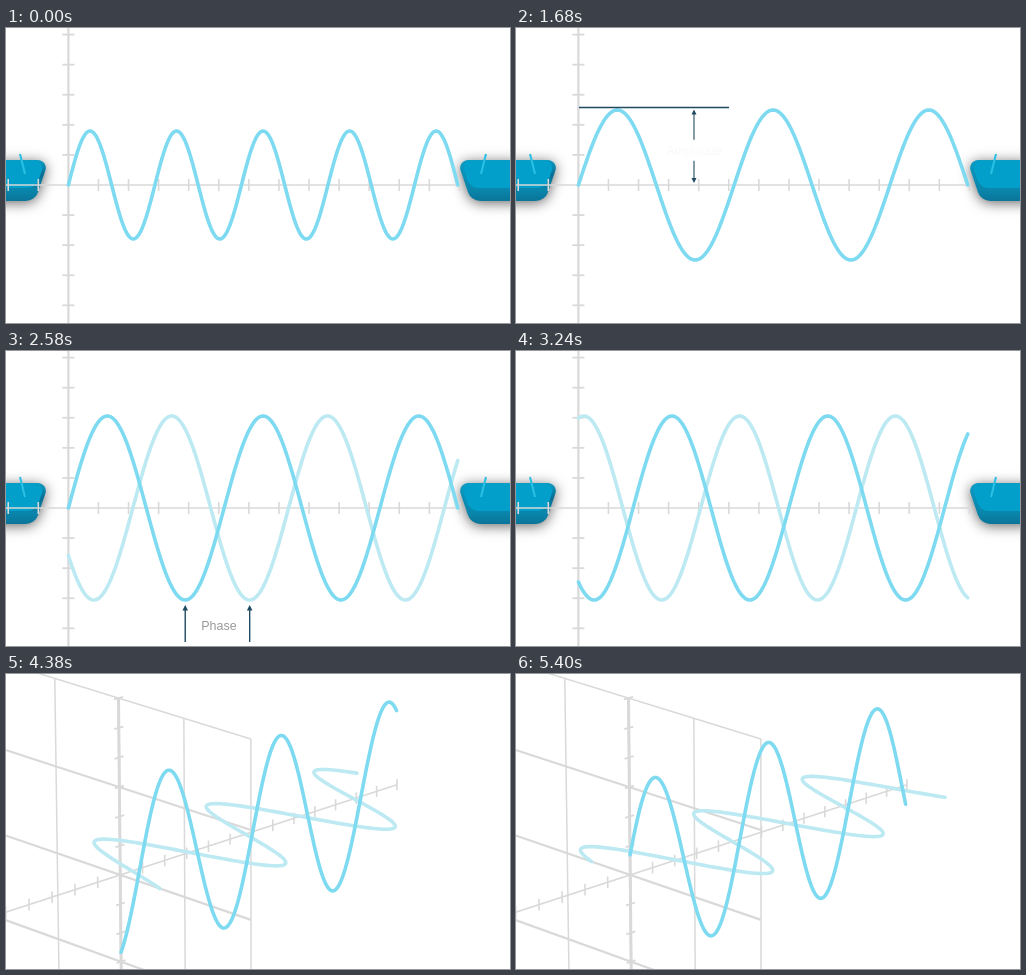
An HTML page with a canvas that plays this animation: 504x295 px, repeating every 5460 ms.

```html
<!DOCTYPE html>
<html lang="en">
<head>
<meta charset="utf-8">
<title>Wave properties</title>
<style>
  html, body { margin: 0; width: 100%; height: 100%; overflow: hidden; background: #fff; }
  canvas { display: block; }
</style>
</head>
<body>
<canvas id="stage" width="504" height="295"></canvas>
<script>
const ctx = document.getElementById('stage').getContext('2d');
const LOOP = 5460, STEP = 60;
const TICK = 30.08, LENGTH = 13 * TICK, HALF = LENGTH / 2, SPAN = 389.4;
const FOCUS = 5000, TAU = Math.PI * 2;
const GREY = '#d9d9d9', INK = '#1f4a60', DARK = '#7ddaf0', LIGHT = '#bce9f2';

const ramp = (t, a, b) => Math.min(1, Math.max(0, (t - a) / (b - a)));
const ease = (t, a, b) => { const x = ramp(t, a, b); return x * x * (3 - 2 * x); };
const mix = (a, b, k) => a + (b - a) * k;
const pulse = (t, a, b, c, d) => ramp(t, a, b) * (1 - ramp(t, c, d));

// Travel of the waves in periods: [time, value, speed per ms]
const TRAVEL = [
  [2640, 0, 0], [3240, 0.351, 0.000625], [3660, 0.637, 0.000718],
  [4380, 1.169, 0.000766], [5400, 1.964, 0.00078]
];

function travel(t) {
  if (t <= TRAVEL[0][0]) return 0;
  const i = Math.max(1, TRAVEL.findIndex(k => t <= k[0]));
  const [t0, v0, m0] = TRAVEL[i - 1], [t1, v1, m1] = TRAVEL[i];
  const d = t1 - t0, x = (t - t0) / d, y = 1 - x;
  return v0 * y * y * (1 + 2 * x) + v1 * x * x * (3 - 2 * x) + d * x * y * (m0 * y - m1 * x);
}

// u runs along the wave from the origin, v up, w towards the viewer
function camera(k) {
  const yaw = k * Math.PI / 4, pitch = k * 19 * Math.PI / 180;
  const ca = Math.cos(yaw), sa = Math.sin(yaw), cp = Math.cos(pitch), sp = Math.sin(pitch);
  const cx = mix(257.9, 256.2, k), cy = mix(157, 154.7, k);
  return (u, v, w) => {
    const x = (u - HALF) * ca + w * sa, d = (u - HALF) * sa - w * ca;
    const s = FOCUS / (FOCUS + d * cp - v * sp);
    return [cx + x * s, cy - (v * cp + d * sp) * s];
  };
}

function path(points, color, width) {
  ctx.beginPath();
  points.forEach(p => ctx.lineTo(p[0], p[1]));
  ctx.strokeStyle = color;
  ctx.lineWidth = width;
  ctx.stroke();
}

function faded(alpha, draw) {
  if (alpha <= 0) return;
  ctx.save();
  ctx.globalAlpha *= alpha;
  draw();
  ctx.restore();
}

// Slab entering from the left edge, with a rounded, tapering end
function slab(top, right, bottom, round, taper, fill) {
  ctx.fillStyle = fill;
  ctx.beginPath();
  ctx.moveTo(-20, top);
  ctx.arcTo(right, top, right - taper, bottom, round);
  ctx.arcTo(right - taper, bottom, -20, bottom, round + 5);
  ctx.lineTo(-20, bottom);
  ctx.fill();
}

function pod(edge) {
  const side = ctx.createLinearGradient(0, 132, 0, 174);
  side.addColorStop(0, '#0c9cc4');
  side.addColorStop(0.35, edge);
  side.addColorStop(0.7, '#0a86ac');
  side.addColorStop(1, '#0a7398');
  ctx.save();
  ctx.shadowColor = 'rgba(0,0,0,.6)';
  ctx.shadowBlur = 13;
  ctx.shadowOffsetY = 2;
  slab(132, 43, 173, 8, 14, side);
  ctx.restore();
  slab(133, 39, 160, 7, 9, '#019fc9');
  path([[14, 126], [19, 146]], '#2cbfe4', 2);
}

function pods() {
  pod('#086f94');
  ctx.save();
  ctx.translate(494, 0);
  ctx.scale(-1, 1);
  pod('#0a8fb6');
  ctx.restore();
}

function axes(at) {
  const line = (a, b, width) => path([at(...a), at(...b)], GREY, width);
  line([-6 * TICK, 0, 0], [LENGTH, 0, 0], 1.6);
  line([0, -6 * TICK, 0], [0, 6 * TICK, 0], 2.2);
  for (let i = -6; i <= 13; i++) {
    const p = i * TICK;
    if (i) line([p, -6, 0], [p, 6, 0], 1.6);
    if (i && i <= 6) line([-6, p, 0], [6, p, 0], 1.8);
  }
}

function grid(at) {
  const size = 6 * TICK;
  for (let i = -2; i <= 2; i++) {
    const p = i * 3 * TICK;
    path([at(0, -size, p), at(0, size, p)], GREY, i ? 1.5 : 3);
    path([at(0, p, -size), at(0, p, size)], GREY, Math.abs(i) === 2 ? 1.5 : 2.2);
  }
}

function wave(at, cycles, amp, shift, roll, color) {
  const points = [];
  for (let i = 0; i <= 300; i++) {
    const k = i / 300, y = amp * Math.sin(TAU * (k * cycles - shift));
    points.push(at(k * SPAN, y * Math.cos(roll), y * Math.sin(roll)));
  }
  path(points, color, 3.6);
}

function arrow(x, tail, tip, width) {
  const dir = Math.sign(tip - tail), head = 1.4 + width;
  path([[x, tail], [x, tip - dir * 4]], INK, width);
  ctx.fillStyle = INK;
  ctx.beginPath();
  ctx.moveTo(x, tip);
  ctx.lineTo(x - head, tip - dir * head * 2);
  ctx.lineTo(x + head, tip - dir * head * 2);
  ctx.fill();
}

function label(text, x, y) {
  ctx.font = '12.5px "Liberation Sans", Arial, sans-serif';
  ctx.textAlign = 'center';
  ctx.fillStyle = '#999';
  ctx.fillText(text, x, y);
}

function render(t) {
  const turn = ease(t, 3240, 3752);
  const roll = ease(t, 3360, 3870) * Math.PI / 2;
  const cycles = mix(4.5, 2.5, ease(t, 180, 720));
  const amp = mix(54, 92, ease(t, 1450, 1880));
  const gap = 0.434 * ease(t, 2340, 2616);
  const shift = travel(t), period = SPAN / cycles;
  const at = camera(turn);

  ctx.fillStyle = '#fff';
  ctx.fillRect(0, 0, 504, 295);
  ctx.lineCap = 'butt';
  faded(1 - ramp(t, 3240, 3480), pods);
  faded(ramp(turn, 0.02, 0.3), () => grid(at));
  axes(at);
  ctx.lineCap = ctx.lineJoin = 'round';
  if (t >= 2340) wave(at, cycles, amp, shift + gap, roll, LIGHT);
  wave(at, cycles, amp, shift, 0, DARK);
  ctx.lineCap = 'butt';

  faded(pulse(t, 120, 300, 720, 960), () => {
    const x = 62.4 + period / 4;
    arrow(x, 69, 98, 1.4);
    arrow(x + period, 69, 98, 1.4);
    label('Frequency', x + period / 2, 88);
  });

  faded(pulse(t, 1200, 1380, 2100, 2340), () => {
    const top = 157 - amp - 2.5, mid = (top + 165) / 2;
    path([[63, top], [mix(63, 213, ease(t, 1200, 1440)), top]], INK, 1.4);
    arrow(178, mid - 10.5, top + 2, 1.1);
    arrow(178, mid + 10.5, 155, 1.1);
    faded(ramp(t, 1670, 1850), () => label('Amplitude', 178, mid + 5));
  });

  faded(pulse(t, 2340, 2460, 2700, 2940), () => {
    const x = 62.4 + period * 0.75, tail = mix(262, 291, ease(t, 2300, 2520));
    arrow(x, tail, 254, 1.4);
    arrow(x + gap * period, tail, 254, 1.4);
    faded(ramp(t, 2400, 2540), () => label('Phase', 213, 279));
  });
}

const start = performance.now();
function tick() {
  const t = (performance.now() - start) % LOOP;
  render(t < 2 * STEP ? 0 : Math.floor(t / STEP) * STEP);
  requestAnimationFrame(tick);
}
tick();
</script>
</body>
</html>
```
